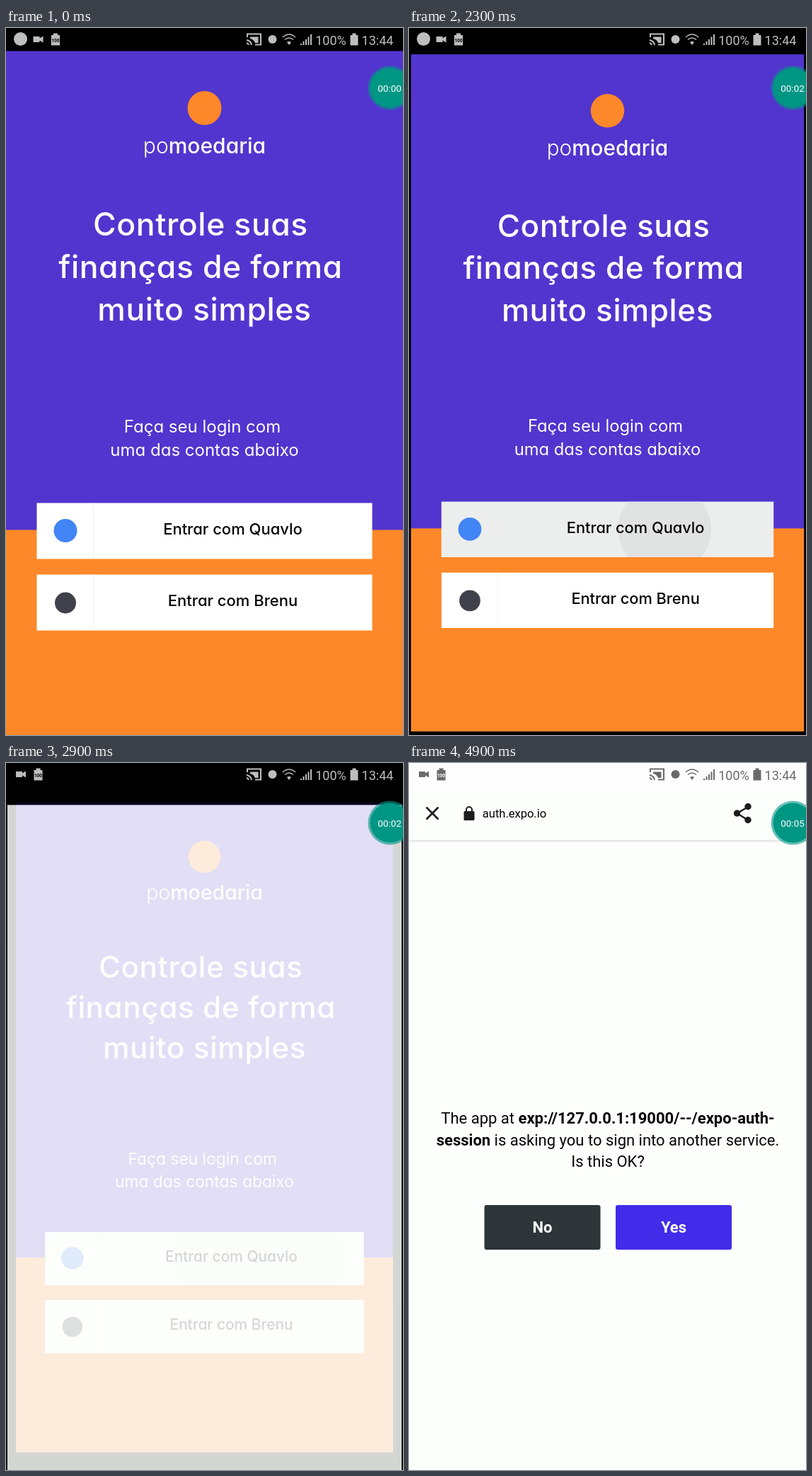
An HTML page that plays this animation: 561x998 px, repeating every 5400 ms.

```html
<!DOCTYPE html>
<html lang="pt-BR">
<head>
<meta charset="utf-8">
<title>Login</title>
<style>
  html, body { margin: 0; width: 100%; height: 100%; overflow: hidden; background: #000; }
  svg { display: block; width: 100%; height: 100%; }
  text { text-anchor: middle; white-space: pre; }
  /* cv11 gives Inter a single-storey "a" */
  .app text { font-family: Inter, sans-serif; font-feature-settings: "cv11"; fill: #fefefe; }
  .app .brand { font-size: 30px; font-weight: 300; }
  .app .brand tspan { font-weight: 500; }
  .app .headline { font-size: 44.5px; font-weight: 500; letter-spacing: .6px; }
  .app .hint { font-size: 24px; }
  .app .entry { font-size: 22px; font-weight: 500; fill: #050505; }
  .tab text, .status text, .timer text { font-family: Roboto, sans-serif; }
  .tab .message { font-size: 22px; fill: #050505; }
  .tab .choice { font-size: 22px; font-weight: 700; fill: #fff; }
  .bold { font-weight: 700; }
  .status { font-size: 18px; }
  .line { fill: none; stroke: currentColor; }
</style>
</head>
<body>
<svg viewBox="0 0 561 998" preserveAspectRatio="none">
  <defs>
    <clipPath id="firstButton"><path d="M43.5 670.5h474v79h-474z"/></clipPath>
  </defs>
  <rect width="561" height="998"/>

  <g class="app" id="app">
    <rect y="32.5" width="561" height="677" fill="#5235ce"/>
    <rect y="708.5" width="561" height="289.5" fill="#fd8829"/>
    <circle cx="280.5" cy="113" r="24" fill="#fd8829"/>
    <text class="brand" x="280.5" y="177">po<tspan>moedaria</tspan></text>
    <g class="headline">
      <text x="275" y="293">Controle suas</text>
      <text x="275" y="353">finanças de forma</text>
      <text x="280.5" y="413">muito simples</text>
    </g>
    <g class="hint">
      <text x="277.5" y="571">Faça seu login com</text>
      <text x="280.5" y="604">uma das contas abaixo</text>
    </g>
    <path d="M43.5 670.5h474v79h-474zM43.5 771.5h474v79h-474z" fill="#fefffe"/>
    <path d="M123.5 670.5v79m0 22v79" stroke="#eff1f1"/>
    <g id="press" clip-path="url(#firstButton)">
      <rect x="43" y="670" width="475" height="80" fill="#eceeed"/>
      <circle id="ripple" cx="362" cy="710" fill="#e1e3e3"/>
    </g>
    <circle cx="84" cy="709.5" r="16.5" fill="#4285f4"/>
    <circle cx="84" cy="811.5" r="15" fill="#41414c"/>
    <text class="entry" x="320.5" y="715">Entrar com Quavlo</text>
    <text class="entry" x="320.5" y="816">Entrar com Brenu</text>
  </g>

  <g class="tab" id="tab">
    <rect width="561" height="34"/>
    <rect y="33" width="561" height="965" fill="#fdfffd"/>
    <g id="toolbar" color="#1d1d1d">
      <path d="M0 110h561" stroke="#dcdddc" stroke-width="1.5"/>
      <path class="line" d="M24.5 62.5l17 17m0-17l-17 17" stroke-width="2.7"/>
      <path class="line" d="M479 62l-15.5 9 15.5 9.5" stroke-width="2.5"/>
      <g fill="currentColor">
        <circle cx="479" cy="61.5" r="4.7"/>
        <circle cx="463.5" cy="71" r="4.7"/>
        <circle cx="479" cy="80.5" r="4.7"/>
      </g>
    </g>
    <g id="address" color="#1d1d1d">
      <rect x="77.5" y="68" width="15" height="13" rx="1.5" fill="currentColor"/>
      <path class="line" d="M81 69v-3a4 4 0 0 1 8 0v3" stroke-width="2"/>
      <text x="149" y="77" font-size="16.5">auth.expo.io</text>
    </g>
    <g id="content">
      <g class="message">
        <text x="281" y="509">The app at <tspan class="bold">exp://127.0.0.1:19000/--/expo-auth-</tspan></text>
        <text x="281" y="540"><tspan class="bold">session</tspan> is asking you to sign into another service.</text>
        <text x="281" y="570">Is this OK?</text>
      </g>
      <rect x="106.5" y="624" width="164" height="63" rx="3" fill="#2d3538"/>
      <rect x="292" y="624" width="164" height="63" rx="3" fill="#432ce9"/>
      <text class="choice" x="188.5" y="663">No</text>
      <text class="choice" x="374" y="663">Yes</text>
    </g>
  </g>

  <g class="status" id="status">
    <rect id="bar" width="561" height="33"/>
    <g fill="currentColor">
      <circle id="notice" cx="20.5" cy="15.5" r="9.5"/>
      <g id="notices">
        <path d="M14 12h9v2.500l5-3v9l-5-3V20h-9z"/>
        <path d="M39.5 10h3V7.500h6V10h3v14.500h-12z"/>
        <text id="level" x="45.5" y="19.5" font-size="6.5" font-weight="700">100</text>
      </g>
      <path d="M345 12.5h11.500v8.500h-4.500q-2-5-7-6z"/>
      <circle cx="376.5" cy="16" r="6"/>
      <path d="M400 24l-3-4q3-2 6 0zM416 22h2v2h-2zM419.5 19h2v5h-2zM423 16h2v8h-2zM426.5 12.500h2V24h-2zM430 9h2v15h-2z"/>
      <path d="M486.5 10h3V7.500h5V10h3v14.500h-11z"/>
      <text x="459" y="23.5">100%</text>
      <text x="525" y="23.5">13:44</text>
    </g>
    <path class="line" d="M341 13V8.500h19v15h-8M340 17q6 1 7 7M340 21q2 .5 3 3" stroke-width="2"/>
    <path class="line" d="M391 13q9-8 18 0M394 16.500q6-5 12 0" stroke-width="1.6"/>
  </g>

  <g class="timer">
    <circle cx="542.5" cy="84.5" r="31" fill="#009684" fill-opacity=".6"/>
    <circle cx="542.5" cy="84.5" r="28" fill="#009684"/>
    <text id="clock" x="542" y="90" font-size="13.5" fill="#fff"></text>
  </g>
</svg>
<script>
const LOOP = 5400, STEP = 100;
const $ = id => document.getElementById(id);

// Each track is a list of [time, value], joined by straight lines.
const tracks = {
  appScale: [[2200, 1], [2300, .99], [2400, .979], [2500, .968], [2600, .959], [2800, .95]],
  rippleRadius: [[1900, 24], [2600, 98], [2800, 120]],
  pressOpacity: [[1800, 0], [1900, 1], [2600, 1], [2800, .65], [3000, 0]],
  tabOpacity: [[2600, 0], [2700, .35], [2800, .67], [2900, .84], [3000, .95], [3100, 1]],
  tabScale: [[2700, .973], [2800, .984], [2900, .993], [3000, .998], [3100, 1]],
  tabShift: [[2700, 85], [2800, 49], [2900, 23], [3000, 8], [3100, 0]],
  toolbar: [[3100, 0], [3200, .28], [3300, .6], [3400, .85], [3500, 1]],
  barGrey: [[3100, 0], [3300, 139], [3500, 254]],
  iconGrey: [[3100, 190], [3300, 112], [3500, 106]]
};
const ticks = [700, 1700, 3100, 3700, 4700];

function valueAt(name, t) {
  const keys = tracks[name];
  const next = keys.findIndex(([time]) => time > t);
  if (next === 0) return keys[0][1];
  if (next < 0) return keys[keys.length - 1][1];
  const [t0, v0] = keys[next - 1], [t1, v1] = keys[next];
  return v0 + (v1 - v0) * (t - t0) / (t1 - t0);
}

const grey = v => `rgb(${v},${v},${v})`;
const zoom = (scale, dy = 0) =>
  `translate(280.5 ${499 + dy}) scale(${scale}) translate(-280.5 -499)`;
const show = (id, opacity) => $(id).setAttribute("opacity", Number(opacity));

function draw(t) {
  const at = name => valueAt(name, t);

  $("app").setAttribute("transform", zoom(at("appScale")));
  $("ripple").setAttribute("r", at("rippleRadius"));
  show("press", at("pressOpacity"));

  $("tab").setAttribute("transform", zoom(at("tabScale"), at("tabShift")));
  show("tab", at("tabOpacity"));
  show("toolbar", at("toolbar"));
  show("address", t >= 3900);
  show("content", t >= 4000);

  const bar = grey(at("barGrey"));
  show("bar", t >= 3100);
  $("bar").setAttribute("fill", bar);
  $("level").setAttribute("fill", bar);
  $("status").style.color = grey(at("iconGrey"));
  show("notice", t < 2400);
  $("notices").setAttribute("transform", `translate(${t < 2400 ? 24.5 : 0} 0)`);

  $("clock").textContent = "00:0" + ticks.filter(time => time <= t).length;
}

const start = performance.now();
function frame() {
  const t = (performance.now() - start) % LOOP;
  draw(Math.floor(t / STEP) * STEP);
  requestAnimationFrame(frame);
}
draw(0);
requestAnimationFrame(frame);
</script>
</body>
</html>
```
